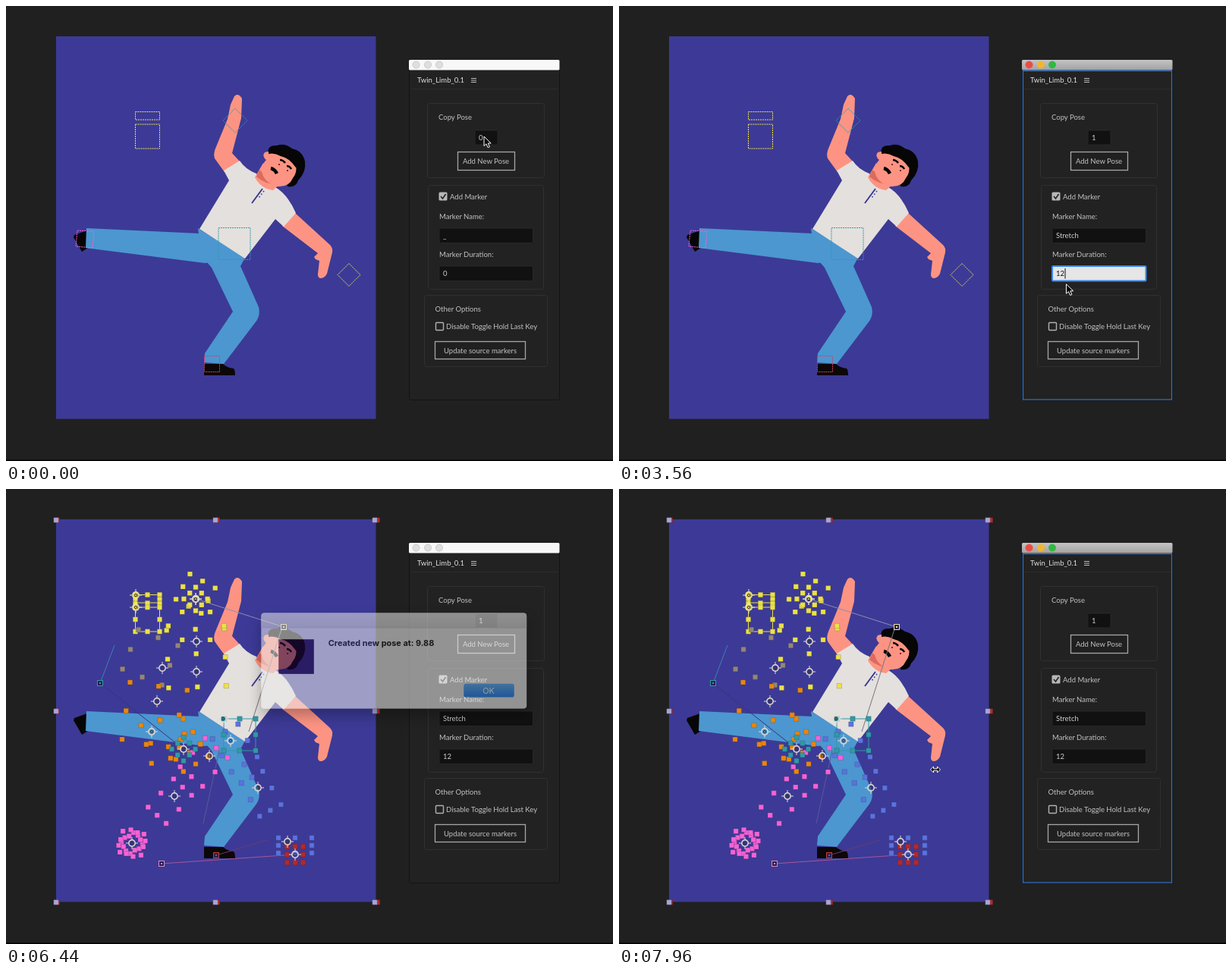
Animation, 800 px wide and 600 px high, one loop 8000 ms. Source, as an HTML page:

```html
<!DOCTYPE html>
<html lang="en">
<head>
<meta charset="utf-8">
<title>Pose panel</title>
<style>
html, body { margin: 0; width: 100%; height: 100%; overflow: hidden; background: #202020; }
svg { display: block; width: 100vw; height: 100vh; }
text { font: 9.5px Lato, sans-serif; fill: #c2c2c2; white-space: pre; }
</style>
</head>
<body>
<svg id="stage" viewBox="0 0 800 600"></svg>
<script>
const LOOP = 8000;
const stage = document.getElementById('stage');
const $ = id => document.getElementById(id);

const C = {
  orange: '#e8860f', pink: '#f562d8', blue: '#5b72e0', yellow: '#ece04a',
  grey: '#948678', teal: '#2f9aa6', red: '#b5282c', lilac: '#aaa5d6'
};

// ---------- drawing helpers ----------
const shape = (d, fill, extra = '') => `<path d="${d}" fill="${fill}" ${extra}/>`;
const line = (d, stroke, width = 1, extra = '') =>
  `<path d="${d}" fill="none" stroke="${stroke}" stroke-width="${width}" ${extra}/>`;
const rect = (x, y, w, h, fill, extra = '') =>
  `<rect x="${x}" y="${y}" width="${w}" height="${h}" fill="${fill}" ${extra}/>`;
const label = (x, y, s, extra = '') => `<text x="${x}" y="${y}" ${extra}>${s}</text>`;
const dashed = (d, color) => line(d, color, 1, 'stroke-dasharray="2 1"');

// ---------- figure ----------
const SKIN = '#fd9483', JEANS = '#4c97d0', INK = '#070606', SEAM = '#34328f';
const figure =
  shape('M107 296L90 302L89 305L100 324L108 319z', INK) +
  shape('M261 472H286Q291 477 300 478Q302 480 302 487H261z', '#0c0708') +
  shape('M106 293L256 300L270 338L262 339L105 319z', JEANS) +
  shape('M253 293L315 332L309 343L333 397Q336 409 328 418L287 472L261 470L262 458L299 403L271 345L258 330z', JEANS) +
  shape('M301 119Q306 114 311 122L310 148L298 194L309 206L288 219L275 201Q273 195 276 188L292 149L296 130z', SKIN) +
  shape('M381 273L427 315Q431 319 430 325L423 353Q420 359 414 359Q411 358 411 354L413 336L408 334L406 331L411 326L364 290z', SKIN) +
  shape('M308 204Q315 215 330 221Q336 236 355 239Q371 248 382 273L366 291L355 281L315 333L255 294L294 230L287 217z', '#e4e0dd') +
  shape('M339 207L328 226Q336 241 352 243L362 234z', SKIN) +
  shape('M334 216L330 225Q341 235 357 235z', '#dc6b5d') +
  shape('M346 196Q343 183 357 184Q367 180 377 188Q391 191 394 205Q396 219 385 230Q382 240 371 238L368 215z', INK) +
  shape('M341 193Q346 191 352 193Q371 193 382 210Q384 220 378 227Q373 239 358 238Q339 233 337 217Q338 207 343 203Q337 198 341 193z', SKIN) +
  shape('M346 195Q345 184 359 184Q375 187 387 208L382 213Q373 200 362 198Q354 193 346 195z', INK) +
  line('M361 203Q365 203 368 207M370 211Q374 211 376 215', INK, 2.6) +
  line('M349 214Q354 215 357 221', INK, 4.5) +
  shape('M359 208h2v2h-2zM370 216h2v2h-2z', '#7b2635') +
  line('M338 241L324 260', SEAM, 1.8) +
  line('M338 243L331 252', SEAM, 1.6, 'stroke-dasharray="1.5 3" transform="translate(2 1)"');

const YRECTS = 'M170.5 139.5h32v10.5h-32zM170.5 156h32v32h-32z';
const guides =
  dashed(YRECTS, C.yellow) +
  dashed('M452 339.500l15 15l-15 15l-15-15z', C.yellow) +
  dashed('M302 135l16 16l-16 16l-16-16z', C.teal) +
  dashed('M280 292.500h42v42h-42z', C.teal) +
  dashed('M94 296l22 1l-2 22l-22-2z', C.pink) +
  dashed('M261.500 461.500h20v21h-20z', '#d04068');

// ---------- selection overlay ----------
// Eight handles around a rotated layer box
function box(color, [cx, cy], hw, hh = hw, deg = 0) {
  const a = deg * Math.PI / 180, cos = Math.cos(a), sin = Math.sin(a);
  let d = '';
  for (const i of [-1, 0, 1]) for (const j of [-1, 0, 1]) {
    if (!i && !j) continue;
    const x = cx + i * hw * cos - j * hh * sin, y = cy + i * hw * sin + j * hh * cos;
    d += `M${x - 3.2} ${y - 3.2}h6.4v6.4h-6.4z`;
  }
  return shape(d, color, 'stroke="#222" stroke-opacity=".3" stroke-width=".6"');
}
const anchor = ([x, y], color = '#e3dcd6') =>
  `<g transform="translate(${x} ${y})" fill="none" stroke="${color}">
   <circle r="4.2" stroke-width="1.400"/><circle r="1.600" stroke="#333"/>
   <path d="M-8 0h4M4 0h4M0-8v4M0 4v4"/></g>`;
const knob = ([x, y], color) =>
  rect(x - 3.5, y - 3.5, 7, 7, '#25214f', `stroke="${color}"`) + rect(x - 1, y - 1, 2, 2, color);
const link = ([x, y], [u, v], color) => line(`M${x} ${y}L${u} ${v}`, color);
const plus = ([x, y], dx, dy) => [x + dx, y + dy];

// A layer box that follows the bone from a to b
function bone(color, a, b, along, hw, hh, twist = 0) {
  const angle = Math.atan2(b[1] - a[1], b[0] - a[0]);
  const at = plus(a, along * Math.cos(angle), along * Math.sin(angle));
  return box(color, at, hw, hh, angle * 180 / Math.PI + twist);
}
const arm = (color, [shoulder, elbow, hand]) =>
  bone(color, shoulder, elbow, 18, 38, 38, -2) +
  bone(color, elbow, hand, 20.5, 26, 26, 46) +
  bone(color, hand, plus(hand, hand[0] - elbow[0], hand[1] - elbow[1]), 7, 19, 19, 30);
const leg = (color, [hip, knee, foot]) =>
  bone(color, hip, knee, 11, 25, 19.5) + bone(color, knee, foot, 9, 25, 16);

const rest = {
  left: [[308, 229], [288, 197], [302, 151]], right: [[358, 267], [387, 293], [422, 327]],
  back: [[260, 320], [188, 314], [104, 306]], front: [[288, 339], [318, 405], [271, 472]],
  head: [365, 212], tilt: -27, neck: [349, 224], hips: [301, 314], grip: [452, 355], sole: [271, 472]
};
const nudge = v => typeof v === 'number' ? v : typeof v[0] === 'number' ? plus(v, 6, 11) : v.map(nudge);
const nudged = {
  ...Object.fromEntries(Object.entries(rest).map(([k, v]) => [k, nudge(v)])),
  left: [[310, 240], [270, 248], [265, 297]], back: [[266, 330], [200, 303], [123, 272]]
};
const stretch = {
  left: [[199, 280], [192, 320], [234, 343]], right: [[251, 241], [251, 201], [250, 145]],
  back: [[268, 352], [222, 405], [166, 467]], front: [[296, 332], [332, 394], [371, 465]],
  head: [190, 222], tilt: 22, neck: [206, 236], hips: [308, 324], grip: [250, 145], sole: [381, 482]
};

function overlay(p) {
  const toe = p.back[2], heel = p.front[2], hips = p.hips;
  return rect(hips[0] - 21, hips[1] - 21, 42, 42, 'none', `stroke="${C.teal}"`) +
    box(C.grey, p.head, 28, 28, p.tilt) +
    arm(C.orange, p.left) + arm(C.yellow, p.right) + leg(C.blue, p.front) + leg(C.pink, p.back) +
    box(C.teal, hips, 21) + box(C.teal, p.left[2], 11, 11, 45) + box(C.yellow, p.grip, 11, 11, 45) +
    [8, 38, 68].map((deg, i) => box(C.pink, toe, 14 - i * 2, 14 - i, deg)).join('') +
    box(C.blue, plus(heel, 10, 5), 22, 10) + box(C.red, p.sole, 10.5) +
    [...p.left, ...p.right, ...p.back, ...p.front, p.neck, plus(hips, -22, -21), p.grip, p.sole]
      .map(q => anchor(q)).join('');
}

const OLD_HAND = [308, 162], OLD_TOE = [110, 319], OLD_SOLE = [277, 483];
const trails = link([307, 355], [440, 355], '#8f8bb5') + link([302, 462], [338, 454], '#6a3a70') +
  link([254, 431], [275, 334], '#5a579c') + link([285, 293], [317, 306], '#777');
const layouts = {
  first: trails + link([321, 152], [354, 153], '#5d7fae') + link([117, 330], [171, 454], '#7a4a9c') + overlay(rest),
  second: `<g transform="translate(6 11)">${trails}</g>` +
    link(OLD_HAND, [360, 163], '#5d7fae') + link(OLD_TOE, [177, 464], '#7a4a9c') + link(OLD_TOE, [117, 292], '#9a4aac') +
    overlay(nudged) + knob(OLD_HAND, C.teal) + knob(OLD_TOE, C.pink),
  third: link(stretch.grip, [366, 182], '#8f8bb5') + link([363, 185], [320, 320], '#777') +
    link([143, 206], [124, 256], '#3f7fb0') + link([124, 256], stretch.left[2], '#35337c') +
    link([205, 494], stretch.sole, '#a8559c') + link(OLD_SOLE, [344, 463], '#6a3a70') +
    link([260, 441], [281, 345], '#5a579c') + overlay(stretch) +
    knob([366, 182], '#e8e2a0') + knob([124, 256], C.teal) + knob([205, 494], '#e08ac0') + knob(OLD_SOLE, '#c04038')
};
const frameHandles = box(C.red, [278.5, 293], 211, 252) + box(C.lilac, [276, 293], 210, 252) +
  line(YRECTS, C.yellow) + box(C.yellow, [186.5, 145], 16, 5.5) + box(C.yellow, [186.5, 172], 16) +
  anchor([171, 140], '#efe9a0') + anchor([171, 156], '#efe9a0');

// ---------- panel ----------
const field = (id, x, y, w, h) =>
  rect(x, y, w, h, '#111', `id="${id}Box" rx="1.500"`) + label(x + 5, y + h / 2 + 3.5, '', `id="${id}Text"`) +
  rect(0, y + 3, 1, h - 6, '#111', `id="${id}Caret"`);
const button = (id, x, y, w, h, cx, s) =>
  rect(x, y, w, h, '#202020', `id="${id}" stroke="#a6a6a6" stroke-width="1.300"`) +
  label(cx, y + h / 2 + 3.5, s, 'text-anchor="middle"');
const group = (x, y, w, h) => rect(x, y, w, h, 'none', 'rx="3" stroke="#303030"');
const lights = [540.5, 556, 571].map((x, i) =>
  `<circle id="light${i}" cx="${x}" cy="77.500" r="4.600" stroke-width=".8"/>`).join('');

const panel =
  rect(531.5, 71.5, 198, 448, '#222', 'rx="2" stroke="#141414"') +
  rect(531, 71, 198.5, 13.5, '#f8f8f8', 'id="bar" rx="1.500"') + lights +
  line('M534 109.500H728', '#2c2c2c') +
  label(542, 101, 'Twin_Limb_0.1', 'style="fill:#e0e0e0"') +
  line('M613 95.500h7M613 98h7M613 100.500h7', '#bbb') +
  group(555.5, 128.5, 154, 98) + group(556.5, 236.5, 152, 137) + group(551.5, 381.5, 162, 94) +
  label(570, 149.5, 'Copy Pose') + field('pose', 618, 164, 30, 19) +
  button('add', 595.5, 192.5, 75, 24, 632.5, 'Add New Pose') +
  rect(570.5, 245.5, 11, 11, '#b8b8b8', 'rx="1.500"') + line('M573 251l2.500 3l4-6', '#222', 1.6) +
  label(585, 254.5, 'Add Marker') + label(571, 280.5, 'Marker Name:') + field('name', 571, 293, 123.5, 19.5) +
  label(571, 331, 'Marker Duration:') + field('span', 571, 343, 123.5, 19.5) +
  label(565.5, 403, 'Other Options') +
  rect(566.5, 417.5, 10, 10, 'none', 'rx="1" stroke="#b0b0b0" stroke-width="1.400"') +
  label(580, 426, 'Disable Toggle Hold Last Key') +
  button('update', 565.5, 442.5, 119, 23, 625, 'Update source markers') +
  rect(532.5, 85.5, 196, 433.5, 'none', 'id="focusRing" stroke="#3273cf" stroke-width="1.200"');

const dialog =
  rect(335, 163, 352.5, 127, '#ebebeb', 'rx="4" filter="url(#shadow)"') +
  shape('M335 182V167Q335 163 339 163H683.500Q687.500 163 687.500 167V182z', 'url(#strip)') +
  line('M335 182.500H687.500', '#c4c4c4') +
  rect(358, 198, 47, 46, '#1f0740') +
  label(424, 207, 'Created new pose at: 9.88', 'style="font:700 11px Inter,sans-serif;fill:#111"') +
  rect(604, 257, 67, 18, 'url(#ok)', 'rx="3"') +
  label(637, 270, 'OK', 'text-anchor="middle" style="font:11px Inter,sans-serif;fill:#fff"');

const gradient = (id, a, b) =>
  `<linearGradient id="${id}" x2="0" y2="1"><stop stop-color="${a}"/><stop offset="1" stop-color="${b}"/></linearGradient>`;

stage.innerHTML = `<defs>${gradient('strip', '#e6e6e6', '#d6d6d6')}${gradient('ok', '#5fb0fb', '#1a80f6')}
  ${gradient('live', '#c4c4c4', '#a2a2a2')}
  <filter id="shadow" x="-20%" y="-30%" width="140%" height="180%"><feDropShadow dx="0" dy="9" stdDeviation="9" flood-opacity=".5"/></filter></defs>
  ${rect(0, 0, 800, 600, '#202020')}${rect(0, 598.5, 800, 1.5, '#000')}
  ${rect(66, 40, 421.5, 504.5, '#3c3a96')}${figure}
  <g id="guides">${guides}</g><g id="frameHandles">${frameHandles}</g>
  ${Object.entries(layouts).map(([id, art]) => `<g id="${id}">${art}</g>`).join('')}
  ${panel}<g id="dialog">${dialog}</g>
  <g id="cursor">${shape('M0 0V12.500L3 9.800L5.200 14.700L7.400 13.700L5.300 9H9.200z', '#050505', 'id="arrow" stroke="#fff" stroke-width="1"')}
  ${shape('M-6.500 0L-2.500-4V-1.200H2.500V-4L6.500 0L2.500 4V1.200H-2.500V4z', '#050505', 'id="resize" stroke="#fff" stroke-width="1"')}</g>`;

// ---------- timing ----------
const clamp = v => Math.min(1, Math.max(0, v));
const ease = v => v * v * (3 - 2 * v);
const within = (t, ...spans) => spans.some(([a, b]) => t >= a && t < b);
const show = (id, on) => $(id).setAttribute('display', on ? 'inline' : 'none');
const set = (id, key, value) => $(id).setAttribute(key, value);

// Pointer moves: start, end, target
const moves = [
  [0, 0, 630, 172], [720, 1200, 600, 300], [3440, 3800, 560, 554], [4120, 4680, 604, 234],
  [4680, 5040, 632, 205], [6400, 6800, 690, 118], [6800, 7160, 660, 158],
  [7160, 7480, 637, 265], [7640, 7920, 417, 370]
];
const cursorAt = t => moves.reduce(([x, y], [a, b, u, v]) => {
  const k = ease(clamp((t - a) / (b - a || 1)));
  return [x + (u - x) * k, y + (v - y) * k];
}, moves[0].slice(2));

const typed = (t, start, word, step, before) =>
  t < start ? before : word.slice(0, 1 + Math.floor((t - start) / step));

function drawField(id, value, focused, t) {
  const text = $(id + 'Text');
  if (text.textContent !== value) text.textContent = value;
  text.style.fill = focused ? '#111' : '#d0d0d0';
  set(id + 'Box', 'fill', focused ? '#e6e6e6' : '#111');
  set(id + 'Box', 'stroke', focused ? '#3b86e8' : '#2b2b2b');
  set(id + 'Box', 'stroke-width', focused ? 2 : 0.8);
  show(id + 'Caret', focused && t % 1000 < 600);
  if (focused) set(id + 'Caret', 'x', +text.getAttribute('x') + text.getComputedTextLength() + 0.5);
}

function draw(t) {
  const live = within(t, [200, 3800], [5160, 6240], [7680, LOOP]);
  show('focusRing', live);
  set('bar', 'fill', live ? 'url(#live)' : '#f8f8f8');
  ['#ee4b45', '#f1b62f', '#2fb944'].forEach((c, i) => {
    set('light' + i, 'fill', live ? c : '#dedede');
    set('light' + i, 'stroke', live ? c : '#c4c4c4');
  });

  drawField('pose', t < 560 ? '0' : '1', within(t, [200, 1240]), t);
  drawField('name', typed(t, 1800, 'Stretch', 120, '_'), within(t, [1240, 2640]), t);
  drawField('span', typed(t, 2920, '12', 160, '0'), within(t, [2640, 3760]), t);

  const pressed = within(t, [5200, 6200]);
  set('add', 'fill', pressed ? '#2f86ea' : '#202020');
  set('add', 'stroke', pressed ? '#2f86ea' : '#a6a6a6');
  $('add').nextElementSibling.style.fill = pressed ? '#fff' : '#c2c2c2';

  show('guides', t < 3840);
  show('frameHandles', t >= 3840);
  show('first', within(t, [3840, 5320]));
  show('second', within(t, [5320, 6200]));
  show('third', t >= 6200);

  const grow = clamp((t - 6340) / 180);
  const alpha = grow * (1 - clamp((t - 7640) / 120));
  const s = 0.982 + 0.018 * grow;
  show('dialog', alpha > 0);
  set('dialog', 'opacity', alpha);
  set('dialog', 'transform', `translate(511 226.5) scale(${s}) translate(-511 -226.5)`);

  const [x, y] = cursorAt(t);
  show('cursor', !within(t, [520, 720], [1680, 3440], [5240, 6880]));
  set('cursor', 'transform', `translate(${x} ${y})`);
  show('arrow', t < 7840);
  show('resize', t >= 7840);
}

const start = performance.now();
function tick() {
  draw((performance.now() - start) % LOOP);
  requestAnimationFrame(tick);
}
tick();
</script>
</body>
</html>
```
